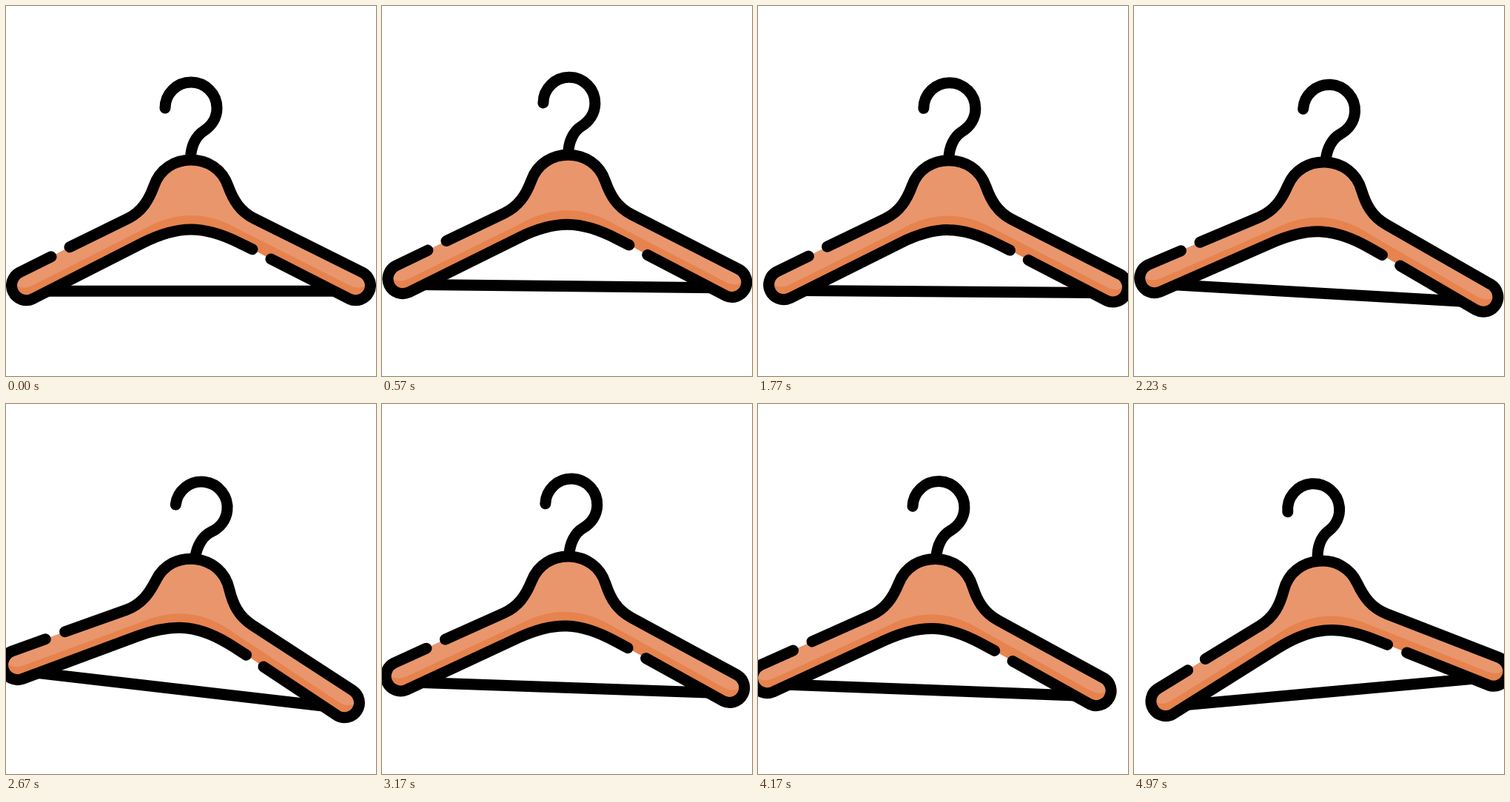
An HTML page for the animation above (5010 ms loop, 500 px wide and 500 px high).

```html
<!DOCTYPE html>
<html lang="en">
<head>
<meta charset="utf-8">
<title>Swaying hanger</title>
<style>
  html, body { margin: 0; width: 100%; height: 100%; overflow: hidden; background: #fff; }
  svg { display: block; width: 100vw; height: 100vh; }
  .line { fill: none; stroke: #000; stroke-width: 15; stroke-linecap: round; stroke-linejoin: round; }
</style>
</head>
<body>
<svg viewBox="0 0 500 500">
  <clipPath id="inside"><path class="body"/></clipPath>
  <g id="hanger">
    <path class="line" d="M50 385.3H450"/>
    <path class="line" d="M215 138A35 35 0 0 1 285 138C285 151 278 162 267 169C256 176 250 190 249.5 205"/>
    <path class="body" fill="#e6834e"/>
    <path clip-path="url(#inside)" fill="#e9966d" d="M6 364Q14 388 36 377.5L185 302Q218 283 250 283T315 302L464 377.5Q486 388 494 364L330 200H170Z"/>
    <path class="line" id="upper"/>
    <path class="line" id="lower"/>
  </g>
</svg>
<script>
  const LOOP = 5010, LAST = 149, STEP = 16;

  // The outline runs clockwise in two strokes, with a gap after each
  const upper = "86 325.8L164 287.5C184 277.5 193 262 200 243C208 220 228 208 250 208"
    + "S292 220 300 243C307 262 316 277.5 336 287.5L481.9 360.1A20 20 0 0 1 464.1 395.9L358 341.9";
  const lower = "333 328.8L315 320C293 309 272 302 250 302S207 309 185 320"
    + "L35.9 395.9A20 20 0 0 1 18.1 360.1L61 338.8";

  const byId = id => document.getElementById(id);
  byId("upper").setAttribute("d", "M" + upper);
  byId("lower").setAttribute("d", "M" + lower);
  for (const body of document.querySelectorAll(".body")) {
    body.setAttribute("d", `M${upper}L${lower}Z`);
  }

  // Wiggle poses, evenly spaced about half a second apart
  const shiftX = [0, 2, -6.5, 6.4, 8, 1.2, 1.8, -3, -10.6, 0.5, 5.9];
  const shiftY = [0, -7, 6.6, 0.3, 3, 1.3, -2.3, -9, 3.5, 6, -1.3];
  const turn = [0, 0.5, 2.7, 0.1, 2.5, 6.6, 1.8, 1.5, 1.9, -3.6, -8];

  // Catmull-Rom curve through the poses
  function wiggle(poses, tick) {
    const i = Math.floor(tick / STEP), u = tick / STEP - i;
    const at = n => poses[Math.max(0, Math.min(poses.length - 1, n))];
    const [a, b, c, d] = [at(i - 1), at(i), at(i + 1), at(i + 2)];
    return b + u / 2 * (c - a + u * (2 * a - 5 * b + 4 * c - d + u * (3 * (b - c) + d - a)));
  }

  const start = performance.now();

  function draw() {
    const time = Math.max(0, performance.now() - start) % LOOP;
    // 30 poses per second, held on a 10 ms grid
    const tick = Math.min(LAST, Math.floor((Math.floor(time / 10) + 0.5) * 0.3));
    const [x, y, angle] = [shiftX, shiftY, turn].map(poses => wiggle(poses, tick).toFixed(3));
    byId("hanger").setAttribute("transform", `translate(${x} ${y}) rotate(${angle} 250 250)`);
    requestAnimationFrame(draw);
  }
  draw();
</script>
</body>
</html>
```
